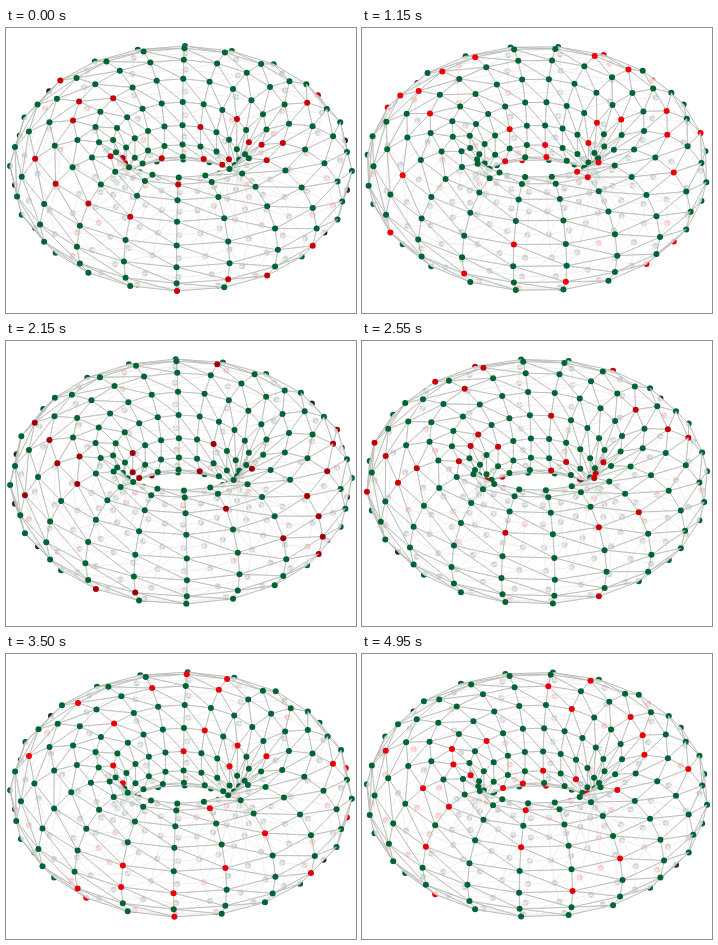
An HTML page with a canvas for the animation above (5 s loop, 350 by 285 pixels).

```html
<!DOCTYPE html>
<html lang="en">
<head>
<meta charset="utf-8">
<title>Rotating torus lattice</title>
<style>
  html, body { margin: 0; overflow: hidden; background: #fff; }
  canvas { display: block; }
</style>
</head>
<body>
<canvas id="stage" width="350" height="285"></canvas>
<script>
const ctx = document.getElementById('stage').getContext('2d');
const COLUMNS = 20, ROWS = 15;
const RING = 114, TUBE = 57, CX = 175, CY = 140.5;
const RAD = Math.PI / 180;
const TILT_SIN = Math.sqrt(1 / 3), TILT_COS = Math.sqrt(2 / 3);
const FRAME_MS = 50, FRAMES = 100, DEGREES_PER_FRAME = 0.5;
const GREEN = '#006432', HIDDEN = '#202a24';

function seededRandom(seed) {
  return () => {
    seed = (seed + 0x6D2B79F5) | 0;
    let n = Math.imul(seed ^ (seed >>> 15), 1 | seed);
    n = (n + Math.imul(n ^ (n >>> 7), 61 | n)) ^ n;
    return ((n ^ (n >>> 14)) >>> 0) / 4294967296;
  };
}

// Orthographic view of the vertex at ring angle theta and tube angle phi.
function project(theta, phi) {
  const radius = RING + TUBE * Math.cos(phi);
  const forward = radius * Math.cos(theta);
  const up = TUBE * Math.sin(phi);
  return {
    x: CX + radius * Math.sin(theta),
    y: CY + forward * TILT_SIN - up * TILT_COS,
    depth: forward * TILT_COS + up * TILT_SIN,
    facing: Math.cos(phi) * Math.cos(theta) * TILT_COS + Math.sin(phi) * TILT_SIN
  };
}

// Faces turned to the viewer veil what lies behind them; the others show only edges.
function drawTriangle([a, b, c]) {
  ctx.beginPath();
  ctx.moveTo(a.x, a.y);
  ctx.lineTo(b.x, b.y);
  ctx.lineTo(c.x, c.y);
  ctx.closePath();
  const towardViewer = (b.x - a.x) * (c.y - a.y) < (b.y - a.y) * (c.x - a.x);
  if (towardViewer) {
    ctx.fillStyle = 'rgba(255,255,255,.79)';
    ctx.fill();
  }
  ctx.strokeStyle = '#b4b9b4';
  ctx.lineWidth = 0.75;
  ctx.stroke();
}

function drawDot(p, color) {
  ctx.beginPath();
  ctx.arc(p.x, p.y, 3, 0, 2 * Math.PI);
  ctx.fillStyle = color;
  ctx.fill();
}

function drawFrame(frame) {
  const random = seededRandom(frame * 7919 + 5);
  const pulse = Math.abs(Math.sin(Math.PI * (frame - 84) / 39)) ** 0.3;
  const red = `rgb(${Math.round(45 + 195 * pulse)},0,8)`;
  const turn = frame * DEGREES_PER_FRAME - 1.5;
  const grid = Array.from({ length: COLUMNS }, (_, i) =>
    Array.from({ length: ROWS }, (_, j) =>
      project((turn + i * 360 / COLUMNS) * RAD, j * 360 / ROWS * RAD)));
  const items = [];
  const addTriangle = (...corners) => items.push({
    depth: corners.reduce((sum, p) => sum + p.depth, 0) / 3,
    draw: () => drawTriangle(corners)
  });

  for (let i = 0; i < COLUMNS; i++) {
    const next = grid[(i + 1) % COLUMNS];
    for (let j = 0; j < ROWS; j++) {
      const k = (j + 1) % ROWS;
      const p = grid[i][j];
      const color = random() < 0.16 ? red : p.facing < -0.2 ? HIDDEN : GREEN;
      addTriangle(p, next[j], grid[i][k]);
      addTriangle(next[j], next[k], grid[i][k]);
      // Lift visible dots above the faces that meet at them.
      items.push({ depth: p.depth + (p.facing > 0 ? 26 : 0), draw: () => drawDot(p, color) });
    }
  }

  ctx.fillStyle = '#fff';
  ctx.fillRect(0, 0, 350, 285);
  items.sort((a, b) => a.depth - b.depth).forEach(item => item.draw());
}

const start = performance.now();
let shown = -1;
function tick() {
  const frame = Math.floor((performance.now() - start) / FRAME_MS) % FRAMES;
  if (frame !== shown) drawFrame(shown = frame);
  requestAnimationFrame(tick);
}
tick();
</script>
</body>
</html>
```
